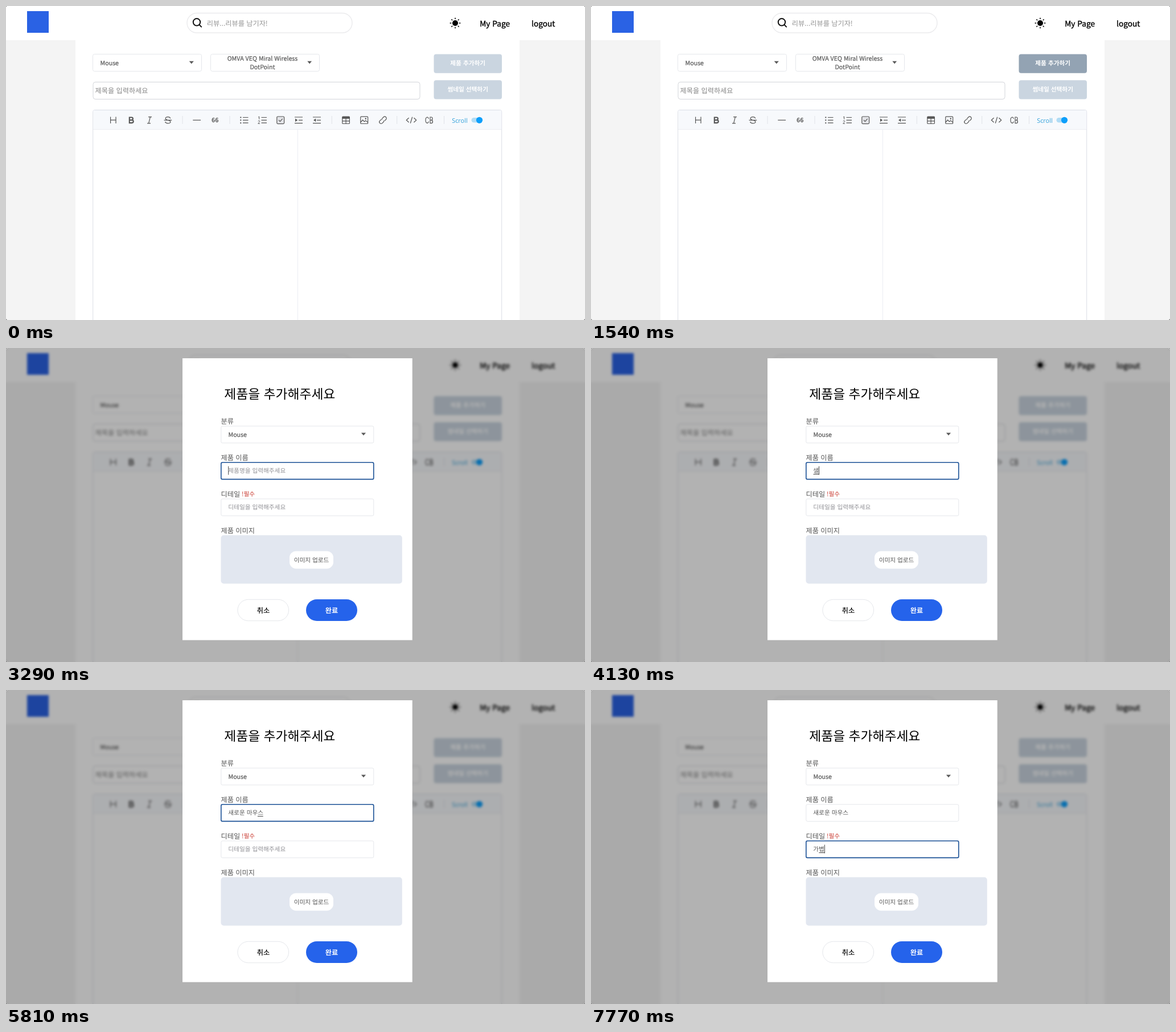
These frames come from a looping animation (1017x551 px, 8000 ms). An HTML page:

```html
<!DOCTYPE html>
<html lang="ko">
<head>
<meta charset="utf-8">
<title>제품 추가</title>
<style>
  html, body { margin: 0; width: 100%; height: 100%; overflow: hidden; background: #555; }
  #stage { position: relative; width: 1017px; height: 551px; overflow: hidden; border-radius: 3px; background: #f4f4f4; }
  #stage > * { position: absolute; left: 0; top: 0; width: 1017px; height: 551px; }
  #shade { background: rgba(0, 0, 0, .3); backdrop-filter: blur(2.2px); }
  svg { display: block; }
  text { font: 10.65px "Noto Sans CJK KR", "Noto Sans CJK JP", "Noto Sans CJK", sans-serif; text-rendering: geometricPrecision; white-space: pre; fill: #555; }
  .md { font-size: 12.18px; }
  .nav { font-size: 13.7px; fill: #000; stroke: #000; stroke-width: .35; }
  .title { font-size: 22.8px; fill: #000; }
  .mid { text-anchor: middle; }
  .w5 { stroke: #555; stroke-width: .2; }
  .bold { font-weight: 700; }
  .white { fill: #fff; }
  .black { fill: #000; stroke: #000; }
  .hint { fill: #919196; }
  .box { fill: #fff; stroke: #e5e7eb; }
  .btn { fill: #cad5e0; }
  .btn.hover { fill: #93a3b3; }
  .box.focus { stroke: #1a5096; stroke-width: 1.6; }
  .icons { fill: none; stroke: #555; stroke-width: 1.2; }
  .icons .fill { fill: #555; stroke: none; }
</style>
</head>
<body>
<div id="stage">
  <svg viewBox="0 0 1017 551">
    <path fill="#fff" d="M0 0H1017V60H902V551H122V60H0Z"/>

    <!-- header -->
    <rect x="37" y="9" width="38" height="38" fill="#2a62e4"/>
    <rect x="318" y="12.5" width="290" height="34.5" rx="17.2" fill="#fff" stroke="#ebebed" stroke-width="1.4"/>
    <g fill="none" stroke="#111" stroke-width="2" stroke-linecap="round">
      <circle cx="335" cy="28.3" r="6.2"/>
      <path d="M339.6 33L343.2 36.6"/>
    </g>
    <text class="md" x="352.7" y="34.6" style="fill:#949494">리뷰...리뷰를 남기자!</text>
    <circle cx="789" cy="30" r="5"/>
    <g id="rays" stroke="#000" stroke-width="1.5" stroke-linecap="round"></g>
    <text class="nav" x="832.2" y="35.5">My Page</text>
    <text class="nav" x="923" y="35.5">logout</text>

    <!-- form -->
    <rect class="box" x="152.5" y="84.5" width="191" height="30" rx="3"/>
    <text class="w5" x="165.6" y="103.7">Mouse</text>
    <path fill="#5c5c5c" d="M321.7 96.8h8.2l-4.1 4.8z"/>
    <rect class="box" x="359.5" y="84.5" width="191" height="30" rx="3"/>
    <text class="mid w5" x="450.5" y="95.7">OMVA VEQ Miral Wireless</text>
    <text class="mid w5" x="450.5" y="111">DotPoint</text>
    <path fill="#5c5c5c" d="M529.3 96.8h7.8l-3.9 4.6z"/>
    <rect x="153" y="133.5" width="574" height="30" rx="4" fill="#fff" stroke="#d3d5da"/>
    <text class="md" x="156.5" y="153.3" style="fill:#858585">제목을 입력하세요</text>
    <rect class="btn" id="add" x="751.5" y="84.6" width="119.5" height="33.2" rx="4"/>
    <text class="mid bold white" x="811.2" y="104">제품 추가하기</text>
    <rect class="btn" x="751.5" y="130.2" width="119.5" height="33.4" rx="4"/>
    <text class="mid bold white" x="811.2" y="149.8">썸네일 선택하기</text>

    <!-- editor -->
    <rect x="152.7" y="182.5" width="718" height="400" rx="3" fill="#fff" stroke="#dadde6"/>
    <path fill="#f7f9fc" d="M153.2 216V185q0-2 2-2H868.2q2 0 2 2V216Z"/>
    <path stroke="#ebedf2" d="M153 216.5H870M512.5 217V551"/>
    <path stroke="#e0e2e8" d="M310 193v14M393 193v14M572.3 193v14M686.7 193v14M769.5 193v14"/>
    <g class="icons">
      <path d="M183.6 194.5v11.5M193 194.5v11.5M183.6 200.2h9.4"/>
      <path stroke-width="2.1" d="M216.8 195.5v9.6h4.4a2.5 2.5 0 0 0 0-5h-4.4h3.8a2.3 2.3 0 0 0 0-4.6z"/>
      <path d="M250 194.7h6M248 205.8h6M253.4 194.7l-2.8 11.1"/>
      <path d="M288.6 197.3c-.6-3.4-8.4-3.6-8.4 0c0 1.6 1.6 2.4 4 3c2.6 .6 4.8 1.2 4.8 3c0 3.6-8.9 3.4-9.4-.4M277.6 200.3h13.6"/>
      <path d="M328.3 200.3h13.8"/>
      <path d="M416 195.5h9.5M416 200.3h9.5M416 205.2h9.5M448.5 195.5h9.5M448.5 200.3h9.5M448.5 205.2h9.5"/>
      <path stroke-width="2" d="M411.3 195.5h2M411.3 200.3h2M411.3 205.2h2"/>
      <path stroke-width="1" d="M443.2 195l1.5-1v4.8M442.9 202.3c.4-1.6 3-1.4 2.8 .3c-.1 1.2-2.6 2.3-2.9 3.7h3.2"/>
      <rect x="475.8" y="194" width="12.8" height="12.6" rx="1.5" fill="#e3e4e8"/>
      <path d="M479 200.2l2.4 2.5l4.2-4.8"/>
      <path d="M507 195h14M514 200.3h7M507 205.7h14M539 195h14M546 200.3h7M539 205.7h14"/>
      <path class="fill" d="M508 197.4l4.3 2.9l-4.3 2.9zM544.3 197.4l-4.3 2.9l4.3 2.9z"/>
      <rect x="590.8" y="194.2" width="12.6" height="12.3" rx="1"/>
      <path d="M597.1 195v11.5M591 201.8h12.4"/>
      <path class="fill" d="M590.8 194.2h12.6v3.6h-12.6z"/>
      <rect x="622.8" y="194.2" width="12.8" height="12.3" rx="1"/>
      <path d="M623 204l3.6-4l2.8 3l2.4-2l3.8 3.4"/>
      <circle class="fill" cx="631.8" cy="197.7" r="1.3"/>
      <g transform="rotate(-45 662 200.3)">
        <path d="M660.5 197.3h-3a3 3 0 0 0 0 6h3a3 3 0 0 0 2.6-1.5M663.5 203.3h3a3 3 0 0 0 0-6h-3a3 3 0 0 0-2.6 1.5"/>
      </g>
      <path d="M707.6 196.3l-4.3 4l4.3 4M716.4 196.3l4.3 4l-4.3 4M713.7 194.8l-3.4 11"/>
      <path d="M742.3 197.9c-.8-4.2-5.3-3.6-5.3 2.4s4.5 6.6 5.3 2.4M745 195v10.7h2.2c3 0 3-5.3 0-5.3h-2.2h2c2.6 0 2.6-5.4 0-5.4z"/>
    </g>
    <text class="mid bold" x="367.2" y="204.2" style="font-size:10.5px">66</text>
    <text x="783.2" y="204.6" style="font-family:'Open Sans','Noto Sans',sans-serif;font-size:10.9px;fill:#2fa0da">Scroll</text>
    <rect x="817.5" y="196" width="18" height="8.6" rx="4.3" fill="#b0dcf5"/>
    <circle cx="831.5" cy="200.3" r="5.6" fill="#0d9ffb"/>
  </svg>

  <div id="shade"></div>

  <svg id="modal" viewBox="0 0 1017 551">
    <rect x="310" y="18" width="403.7" height="494.6" fill="#fff"/>
    <text class="title" x="383.2" y="89.3">제품을 추가해주세요</text>
    <text class="md" x="377.5" y="132.6">분류</text>
    <rect class="box" x="377.8" y="137" width="268" height="29.7" rx="2.5"/>
    <text class="w5" x="390.5" y="155.9">Mouse</text>
    <path fill="#5c5c5c" d="M623.9 148.7h8.2l-4.1 4.8z"/>
    <text class="md" x="377.5" y="196.5">제품 이름</text>
    <text class="md" x="377.5" y="260.5">디테일</text>
    <text x="414" y="260.3" style="fill:#c8372d">!필수</text>
    <g id="fields"></g>
    <text class="md" x="377.5" y="324.5">제품 이미지</text>
    <rect x="377.5" y="328.5" width="318.3" height="85" rx="5" fill="#e2e7f0"/>
    <rect x="498" y="356.5" width="77" height="30.7" rx="11.5" fill="#fff"/>
    <text class="mid" x="536.5" y="376.2">이미지 업로드</text>
    <rect class="box" x="406.9" y="441.3" width="89.7" height="37.4" rx="18.7"/>
    <text class="md mid w5 black" x="452" y="465.2">취소</text>
    <rect x="527" y="441" width="90" height="38" rx="19" fill="#2563eb"/>
    <text class="md mid bold white" x="572" y="465.2">완료</text>
  </svg>
</div>

<script>
const LOOP = 8000, HOVER = 1540, OPEN = 2030, SIZE = 10.65, LEFT = 390.5;
const NAME = '새로운 마우스';

// time, focused field, committed text, syllable being composed, caret shown
const steps = [
  [0, -1, '', '', 0],
  [3290, 0, '', '', 1],
  [3780, 0, '', '', 0],
  [3990, 0, '', 'ㅅ', 1],
  [4060, 0, '', '새', 1],
  [4130, 0, '', '샐', 1],
  [4270, 0, '새', '로', 1],
  [4410, 0, '새', '롱', 1],
  [4480, 0, '새로', '우', 1],
  [4550, 0, '새로', '운', 1],
  [4690, 0, '새로운 ', '', 1],
  [4760, 0, '새로운 ', 'ㅁ', 1],
  [4900, 0, '새로운 ', '마', 1],
  [5110, 0, '새로운 마', '우', 1],
  [5250, 0, '새로운 마우', '스', 1],
  [5810, 0, '새로운 마우', '스', 0],
  [6090, 1, '', '', 1],
  [6580, 1, '', '', 0],
  [7140, 1, '', '', 1],
  [7420, 1, '', 'ㄱ', 1],
  [7490, 1, '', '가', 1],
  [7630, 1, '', '갑', 1],
  [7700, 1, '가', '벼', 1],
  [7770, 1, '가', '볍', 1]
];

const $ = id => document.getElementById(id);

function add(parent, tag, attrs) {
  const el = document.createElementNS('http://www.w3.org/2000/svg', tag);
  for (const k in attrs) el.setAttribute(k, attrs[k]);
  return parent.appendChild(el);
}

// advance of Hangul and space glyphs
const width = s => [...s].reduce((w, c) => w + (c === ' ' ? .224 : .92), 0) * SIZE;

for (let i = 0; i < 8; i++) {
  const a = i * Math.PI / 4, c = Math.cos(a), s = Math.sin(a);
  add($('rays'), 'line', { x1: 789 + 7.4 * c, y1: 30 + 7.4 * s, x2: 789 + 8.8 * c, y2: 30 + 8.8 * s });
}

function makeField(y, hint) {
  const g = $('fields');
  return {
    hint,
    box: add(g, 'rect', { x: 377.8, y: y + .8, width: 268, height: 29.6, rx: 2.5 }),
    text: add(g, 'text', { x: LEFT - .2, y: y + 19.4 }),
    line: add(g, 'rect', { y: y + 21, height: 1, fill: '#444' }),
    caret: add(g, 'rect', { y: y + 7.5, width: .9, height: 15, fill: '#333' })
  };
}

const fields = [makeField(200, '제품명을 입력해주세요'), makeField(264, '디테일을 입력해주세요')];

function drawField(f, focus, done, comp, caret) {
  const value = done + comp;
  f.box.setAttribute('class', focus ? 'box focus' : 'box');
  f.text.setAttribute('class', value ? '' : 'hint');
  f.text.textContent = value || f.hint;
  f.line.setAttribute('x', LEFT + width(done));
  f.line.setAttribute('width', width(comp));
  f.caret.setAttribute('x', LEFT - .2 + width(value));
  f.caret.setAttribute('visibility', caret ? 'inherit' : 'hidden');
}

let last = '';
function draw(t) {
  const step = steps.filter(s => s[0] <= t).pop();
  const open = t >= OPEN, hover = t >= HOVER && !open;
  const key = [step[0], open, hover].join();
  if (key === last) return;
  last = key;
  $('add').setAttribute('class', hover ? 'btn hover' : 'btn');
  for (const id of ['shade', 'modal']) $(id).style.visibility = open ? 'visible' : 'hidden';
  const [, focus, done, comp, caret] = step;
  fields.forEach((f, i) => {
    if (i === focus) drawField(f, true, done, comp, caret);
    else drawField(f, false, i < focus ? NAME : '', '', 0);
  });
}

const start = performance.now();
function tick() {
  draw((performance.now() - start) % LOOP);
  requestAnimationFrame(tick);
}
tick();
</script>
</body>
</html>
```
